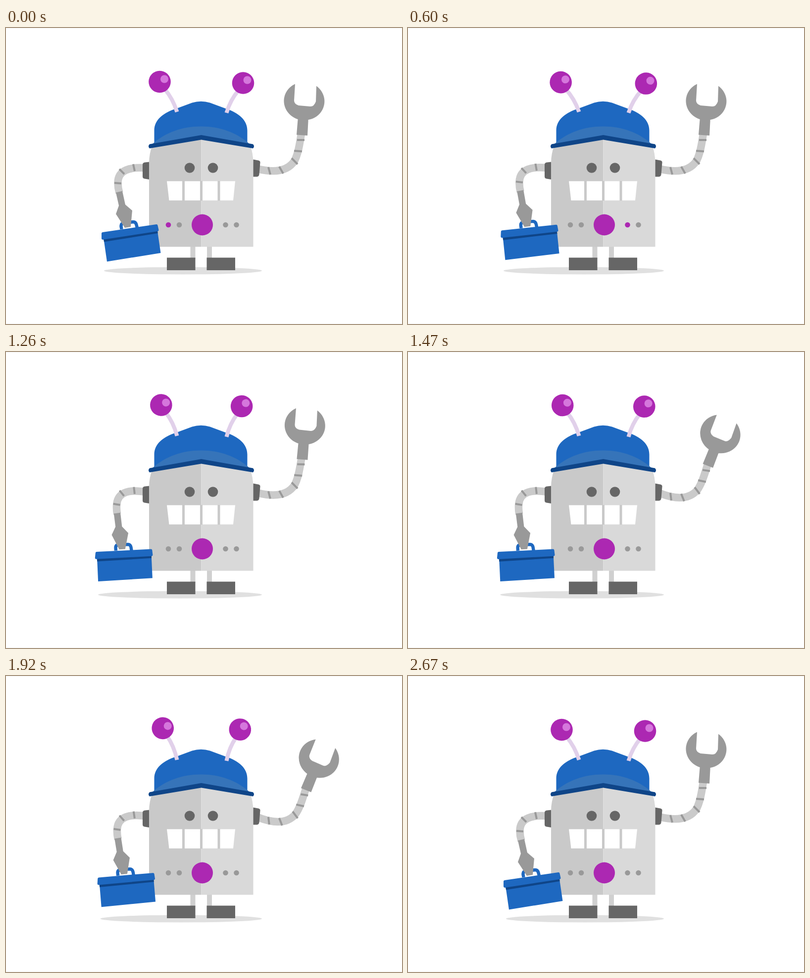
An HTML page that plays this animation: 800x600 px, repeating every 2.7 s.

```html
<!DOCTYPE html>
<html lang="en">
<head>
<meta charset="utf-8">
<title>Handy robot</title>
<style>
html, body { margin: 0; width: 100%; height: 100%; overflow: hidden; background: #fff; }
svg { display: block; }
.tube { fill: none; stroke: #cacaca; stroke-width: 15.5; }
.ring { fill: none; stroke: #999; stroke-width: 4; }
.stem { fill: none; stroke: #e1d0ea; stroke-width: 8; }
.steel { fill: #999; }
.dark { fill: #666; }
.blue { fill: #1e68c0; }
.navy { fill: #0f4588; }
.purple { fill: #ac28b2; }
.shine { fill: #d577dc; }
.lit { fill: #ac28b2; }
</style>
</head>
<body>
<svg width="800" height="600" viewBox="0 0 800 600">
  <path d="M0 .5H800M0 599.5H800" stroke="#f5f5f5"/>
  <ellipse id="shadow" cy="492" ry="7.5" fill="#e0e0e0"/>

  <path d="M372.5 440h10v28h-10zM406 440h10v28h-10z" fill="#d0d0d0"/>
  <path class="dark" d="M325 465.5h57.5V491H325zM405.5 465.5h57.5V491h-57.5z"/>

  <g id="rightArm">
    <path class="tube" d="M506 285C545 295 570 289 583 269C591 253 593 235 597 212"/>
    <path class="ring" d="M530 282L534 297M552 281L560 295M577 264L589 276M582 249L598 250M588 227L603 227"/>
    <path id="wrench" class="steel" d="M584 113.5A41 38.7 5 1 0 627 117.5L626 149Q622 160 614 159L591 157Q582 154 582 147ZM590 180L587 216.5L609 218L611 180Z"/>
  </g>

  <path d="M289 443.5V275Q289 255 295 240L394.5 220V443.5Z" fill="#c9c9c9"/>
  <path d="M499.5 443.5V275Q499.5 255 494 240L394.5 220V443.5Z" fill="#d9d9d9"/>
  <path class="dark" d="M499.5 266.5L510 268.5Q514 269.5 513.5 273L511.5 297Q511 301 507 301.5H499.5Z"/>

  <circle class="dark" cx="371" cy="283.5" r="10.3"/>
  <circle class="dark" cx="418" cy="283.5" r="10.3"/>
  <path d="M325 310.5H463L459 349.5H329.5Z" fill="#fff"/>
  <path d="M358.5 310V350M394.5 310V350M430 310V350" stroke="#c9c9c9" stroke-width="5"/>

  <g id="lamps" class="steel">
    <circle cx="328" cy="399" r="5.3"/>
    <circle cx="350" cy="399" r="5.3"/>
    <circle cx="443.5" cy="399" r="5.3"/>
    <circle cx="465.5" cy="399" r="5.3"/>
  </g>
  <circle class="purple" cx="396.5" cy="399" r="21.5"/>

  <g id="leftArm">
    <path class="tube" d="M284 284C250 281 226 288 226 314Q226 324 229 334"/>
    <path class="ring" d="M257 276L260 290M229 286L239 296M219 314L233 315"/>
    <path d="M233.5 408L232.5 402Q232 396 239 395L257 393Q262 393 263.5 399L265 405" fill="none" stroke="#1e68c0" stroke-width="6.5"/>
    <path class="steel" d="M222 333.5L235 330.5L241 358L255 370L252 403L240 405L222 377L228 360Z"/>
    <path class="blue" d="M197 425L204 473.5L312.5 456L305.5 408Z"/>
    <path class="navy" d="M197 428L306 411L306.7 416L198 433.5Z"/>
    <path class="blue" d="M195.5 416.5L304 400.5L306 409.5L195.5 426.5Z" stroke="#1e68c0" stroke-width="5" stroke-linejoin="round"/>
  </g>
  <path class="dark" d="M289 271.5L280 272.5Q276 273 276 277V301Q276 305 280 305.5L289 307Z"/>

  <path class="blue" d="M299.5 238V208C299.5 186 317 172 345 163L376 151.5Q394 146 412 151.5L443 163C470 172 487.5 186 487.5 208V238L394 222Z"/>
  <path d="M296 235C322 212 355 199.5 394 199.5S466 212 492 235L394 220Z" fill="#3674b9"/>
  <path class="navy" d="M290 235.5L394.5 217L499 235.5Q503 240 499 244L394.5 226.5L290 244Q286 240 290 235.5Z"/>

  <g id="leftAntenna">
    <path class="stem" d="M320 123Q337 143 345.5 170"/>
    <circle class="purple" cx="310.5" cy="109" r="22.3"/>
    <circle class="shine" cx="320" cy="103.5" r="8"/>
  </g>
  <g id="rightAntenna">
    <path class="stem" d="M470 126Q453 146 445.5 172"/>
    <circle class="purple" cx="479" cy="111.5" r="22.3"/>
    <circle class="shine" cx="487.5" cy="105.5" r="8"/>
  </g>
</svg>
<script>
const LOOP = 2700;
const el = id => document.getElementById(id);
const rotate = (id, deg, x, y) => el(id).setAttribute('transform', `rotate(${deg} ${x} ${y})`);

// Keys are [time, value]; the value eases along a half cosine between them.
const WAVE = [[0, 0], [870, 0], [1080, 1], [1290, 0], [1500, 1], [1710, 0], [1920, 1], [2220, 0], [LOOP, 0]];
const WIGGLE = [[0, 0], [1080, -3], [1350, 4.5], [1680, -5.2], [1920, 5.7], [2160, -1.5], [LOOP, 0]];

function ease(keys, t) {
  const i = keys.findIndex(key => key[0] > t);
  const [t0, a] = keys[i - 1], [t1, b] = keys[i];
  return a + (b - a) * (1 - Math.cos(Math.PI * (t - t0) / (t1 - t0))) / 2;
}

function draw(now) {
  const t = now % LOOP;

  const swing = (1 - Math.cos(2 * Math.PI * t / LOOP)) / 2;
  rotate('leftArm', 5.7 * swing, 282, 288);
  const left = 198 - 12 * swing;
  el('shadow').setAttribute('cx', (left + 517) / 2);
  el('shadow').setAttribute('rx', (517 - left) / 2);

  const wave = ease(WAVE, t);
  rotate('rightArm', 8.4 * wave, 505, 284);
  rotate('wrench', 10 * wave, 598, 214);

  const wiggle = ease(WIGGLE, t);
  rotate('leftAntenna', wiggle, 345.5, 170);
  rotate('rightAntenna', -wiggle, 445.5, 172);

  const active = Math.floor(t / 270);
  [...el('lamps').children].forEach((lamp, i) => lamp.classList.toggle('lit', i === active));

  requestAnimationFrame(draw);
}
draw(performance.now());
</script>
</body>
</html>
```
